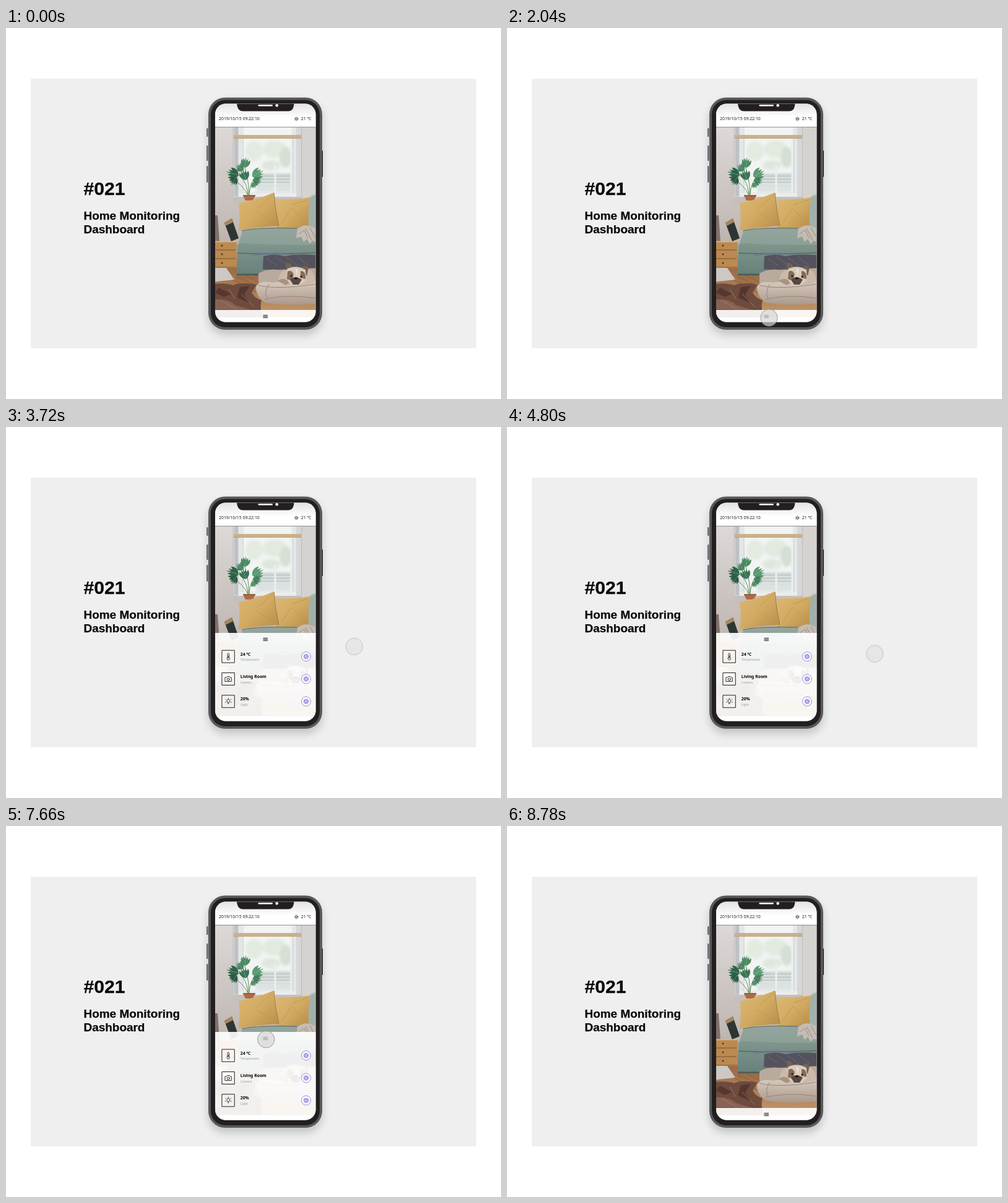
Write an HTML page that moves like this. It is 800x600 px and loops after 9440 ms.

```html
<!DOCTYPE html>
<html lang="en">
<head>
<meta charset="utf-8">
<title>Home Monitoring Dashboard</title>
<style>
html, body { margin: 0; width: 100%; height: 100%; overflow: hidden; background: #fff; }
svg { display: block; width: 800px; height: 600px; }
.title { font-family: "Liberation Sans", Arial, sans-serif; font-weight: 700; fill: #0b0b0b; stroke: #0b0b0b; stroke-width: .25; stroke-linejoin: round; }
.ui { font-family: "Noto Sans", "Noto Sans CJK JP", "Noto Sans CJK", sans-serif; fill: #1c1c1c; }
.name { font-size: 6.8px; font-weight: 700; fill: #000; }
.kind { font-size: 5px; fill: #9b9b9b; }
.line { fill: none; stroke: #222; stroke-width: .9; stroke-linecap: round; stroke-linejoin: round; }
.gear { fill: none; stroke: #7f70d6; stroke-width: .8; }
</style>
</head>
<body>
<svg viewBox="0 0 800 600">
<defs>
  <clipPath id="stage"><rect x="40" y="82" width="720" height="436"/></clipPath>
  <clipPath id="screen"><rect x="338" y="122.500" width="162.500" height="353" rx="17"/></clipPath>
  <clipPath id="view"><rect x="338" y="160" width="162.500" height="308"/></clipPath>
  <filter id="shade" x="-20%" y="-20%" width="140%" height="140%"><feGaussianBlur stdDeviation="7"/></filter>
  <filter id="soft"><feGaussianBlur stdDeviation="2"/></filter>
  <filter id="edge"><feGaussianBlur stdDeviation=".5"/></filter>
  <linearGradient id="top" x2="0" y2="1"><stop stop-color="#e2e2e2"/><stop offset=".6" stop-color="#fff"/></linearGradient>
  <linearGradient id="wall" x2="0" y2="1"><stop stop-color="#dedad8"/><stop offset=".5" stop-color="#c4bcb8"/><stop offset="1" stop-color="#a59890"/></linearGradient>
  <linearGradient id="floor" x2="0" y2="1"><stop stop-color="#9a6b45"/><stop offset="1" stop-color="#c49a6d"/></linearGradient>
  <linearGradient id="seat" x2="0" y2="1"><stop stop-color="#93a59c"/><stop offset="1" stop-color="#8a9f96"/></linearGradient>
  <linearGradient id="front" x2="0" y2="1"><stop stop-color="#7f968d"/><stop offset="1" stop-color="#67807a"/></linearGradient>
  <linearGradient id="gold" x2="1" y2="1"><stop stop-color="#dcb873"/><stop offset=".5" stop-color="#d2aa62"/><stop offset="1" stop-color="#b78b48"/></linearGradient>
  <linearGradient id="bed" x2="0" y2="1"><stop stop-color="#d8cbc0"/><stop offset="1" stop-color="#ab998c"/></linearGradient>
  <g id="leaf">
    <path d="M0 0C-8-3-11-11-8-17L-5-12L-4-19L-1-14L0-22L2-14L5-19L5-12L9-16C11-10 8-3 0 0Z"/>
    <path d="M0-1V-18" stroke="#9cc4a4" stroke-width=".5"/>
  </g>
  <g id="gear" class="gear">
    <circle r="7.500" fill="#fff"/>
    <circle r="3.600" stroke-width="1.200" stroke-dasharray="1.700 1.130"/>
    <circle r="3.100" fill="#dcd7f5"/><circle r="1.300" fill="#fff"/>
  </g>
  <g id="box" class="line"><rect x="-10" y="-10" width="20" height="20" stroke-width="1"/></g>
</defs>

<rect x="40" y="82" width="720" height="436" fill="#efefef"/>

<g class="title">
  <text x="125.500" y="269.500" font-size="30.200">#021</text>
  <text x="125.500" y="310" font-size="18.950">Home Monitoring</text>
  <text x="125.500" y="331.500" font-size="18.950">Dashboard</text>
</g>

<!-- phone body -->
<rect x="327" y="120" width="184" height="376" rx="27" fill="#000" opacity=".18" filter="url(#shade)"/>
<g fill="#58595b">
  <rect x="324.200" y="162" width="2.200" height="14" rx="1"/>
  <rect x="324.200" y="190" width="2.200" height="25" rx="1"/>
  <rect x="324.200" y="223" width="2.200" height="27" rx="1"/>
  <rect x="509" y="198" width="3" height="43" rx="1" fill="#111"/>
  <rect x="327" y="112.500" width="184" height="375.500" rx="27"/>
</g>
<rect x="331" y="116.500" width="176" height="367.500" rx="23" fill="#231f20"/>

<g clip-path="url(#screen)">
  <rect x="338" y="122" width="163" height="354" fill="#fff"/>

  <!-- room view -->
  <g clip-path="url(#view)"><g filter="url(#edge)">
    <rect x="338" y="155" width="163" height="313" fill="url(#wall)"/>
    <rect x="367" y="155" width="111" height="129" fill="#d5d7d8"/>
    <rect x="369" y="155" width="6" height="117" fill="#bfc2c4"/>
    <rect x="376" y="155" width="93" height="117" fill="#e4e7e8"/>
    <rect x="384" y="155" width="78" height="111" fill="#f1f4f2"/>
    <g filter="url(#soft)">
      <ellipse cx="401" cy="199" rx="14" ry="16" fill="#e3ebe1"/>
      <ellipse cx="434" cy="196" rx="19" ry="14" fill="#e2eae0"/>
      <ellipse cx="452" cy="209" rx="10" ry="17" fill="#d5dfd4"/>
      <ellipse cx="428" cy="222" rx="15" ry="8" fill="#dfe6de"/>
      <rect x="404" y="236" width="58" height="16" fill="#c3cdcb"/>
      <rect x="404" y="252" width="58" height="14" fill="#dce2e2"/>
    </g>
    <path d="M404 242H462M404 247H462M404 252H462" stroke="#e6eae9" stroke-width="1.300"/>
    <path d="M435 222V266M461 179V272" stroke="#eceeee" stroke-width="3"/>
    <path d="M383 179V267M463.500 179V267" stroke="#cdd1d2"/>
    <rect x="368" y="173" width="109" height="5" fill="#cbb089"/>
    <path d="M368 178.500H477" stroke="#b09670" stroke-width=".8"/>
    <rect x="376" y="267" width="93" height="6" fill="#ececea"/>
    <rect x="367" y="273" width="111" height="14" fill="#c5c0bd"/>
    <path d="M477.500 155V280M367 155V272" stroke="#b8b5b3" stroke-width=".8"/>
    <rect x="478" y="155" width="30" height="125" fill="#d6d2d0"/>

    <!-- plant -->
    <path d="M391 270C389 250 382 240 369 234M392 270C394 245 384 225 383 212M393 270C394 250 403 240 409 235M391 270C384 257 377 252 372 248" fill="none" stroke="#5d8a5c" stroke-width="1"/>
    <g fill="#4c8a63">
      <use href="#leaf" transform="translate(386 226) rotate(6) scale(.8)"/>
      <use href="#leaf" transform="translate(376 238) rotate(-75) scale(.95)" fill="#2f6349"/>
      <use href="#leaf" transform="translate(398 240) rotate(62) scale(.95)" fill="#5a9a73"/>
      <use href="#leaf" transform="translate(372 241) rotate(-150) scale(.7)" fill="#2a5a42"/>
      <use href="#leaf" transform="translate(399 245) rotate(108) scale(.7)" fill="#437d5a"/>
      <use href="#leaf" transform="translate(388 246) rotate(-18) scale(.85)" fill="#3b7453"/>
      <use href="#leaf" transform="translate(398 250) rotate(150) scale(.5)" fill="#528c66"/>
      <use href="#leaf" transform="translate(384 230) rotate(-58) scale(.7)" fill="#4a8761"/>
    </g>
    <path d="M383 271H403L399 279H387Z" fill="#b06a43"/><path d="M383 271H403" stroke="#8a5032" stroke-width="1.600"/>

    <!-- sofa -->
    <path d="M488 278Q492 268 508 268V337H482Z" fill="#a1b1aa"/>
    <path d="M488 278Q492 270 501 269" fill="none" stroke="#bcc8c1" stroke-width="2"/>
    <path d="M436 277Q465 278 491 274Q488 298 489 322Q462 328 437 324Z" fill="url(#gold)"/>
    <path d="M463 286L487 278M461 291L484 314M460 293L445 317" fill="none" stroke="#b98f4e" stroke-width=".7"/>
    <path d="M376 283Q405 278 433 266Q435 294 441 320Q407 322 376 327Q379 304 376 283Z" fill="url(#gold)"/>
    <path d="M433 267Q435 294 441 320" fill="none" stroke="#a27a3e" stroke-width="1"/>
    <path d="M406 292L431 270M404 297L437 318" fill="none" stroke="#bd934f" stroke-width=".7"/>
    <path d="M382 329Q410 322 508 324V355L374 354Z" fill="url(#seat)"/>
    <path d="M381 328Q410 322 470 324" fill="none" stroke="#6d7a70" stroke-width="1.400"/>
    <path d="M374 351Q376 348 382 348Q445 352 508 350V398L372 400Z" fill="url(#front)"/>
    <path d="M374 364Q438 367 508 363" fill="none" stroke="#56695f" stroke-width="1.600"/>
    <path d="M400 368Q430 362 466 367" fill="none" stroke="#70739b" stroke-width="3" opacity=".5"/>
    <path d="M373 399H420" stroke="#4c5b55" stroke-width="3"/>
    <path d="M471 325Q480 317 491 320L508 327V348L495 344L491 349L486 341L481 346L477 337L469 340Z" fill="#c5bcb3"/>
    <path d="M473 333L482 327L488 340M484 324L494 343M491 323L501 340" fill="none" stroke="#968c83"/>

    <!-- chest -->
    <path d="M338 303V346H345L342 303Z" fill="#7f7069"/>
    <rect x="330" y="345" width="43" height="42" fill="#bb8a51"/>
    <path d="M330 345.500H373" stroke="#d9b47f" stroke-width="2"/>
    <path d="M330 359H371M330 373H371M330 387H372" stroke="#7a5330" stroke-width="1.200"/>
    <g fill="#4d341f"><circle cx="349" cy="352" r="1.400"/><circle cx="349" cy="366" r="1.400"/><circle cx="349" cy="380" r="1.400"/></g>
    <path d="M353 315L365 308L376 340L364 345Z" fill="#2e3532"/>
    <path d="M353 315L365 308L367 314L355 320Z" fill="#a4885c"/>

    <!-- floor -->
    <rect x="330" y="388" width="43" height="80" fill="url(#floor)"/>
    <rect x="372" y="400" width="136" height="68" fill="url(#floor)"/>
    <path d="M330 388H356L369 407L330 411Z" fill="#ccc8c4"/>
    <path d="M372 402L400 414M366 407L415 433M388 401L410 412" stroke="#855c3a" stroke-width=".8"/>
    <path d="M330 415Q352 411 367 416Q382 410 405 415L397 428Q403 438 413 440Q409 452 416 468H330Z" fill="#6f4b3e"/>
    <path d="M344 420L364 430L352 435L338 428ZM378 419L394 417L385 431L394 445L373 436Z" fill="#553730"/>
    <path d="M330 439Q360 437 370 448L396 456L330 455Z" fill="#886353"/>
    <path d="M360 422L370 438M380 430L401 451M346 440L372 455" stroke="#a5806c" stroke-width=".8"/>

    <!-- blankets and dog -->
    <path d="M416 369Q434 364 450 369Q476 364 508 368V390L466 390L444 393L415 390Z" fill="#54535d"/>
    <path d="M422 373L438 384M436 370L456 385M454 371L472 385M471 370L488 384" stroke="#6d6c7c" stroke-width="1.400" stroke-dasharray="2 2"/>
    <path d="M408 397Q421 389 439 391L508 388V418L408 417Z" fill="#b9aa9d"/>
    <path d="M404 418Q411 408 430 412Q466 407 508 409V445Q454 450 418 444Q403 433 404 418Z" fill="url(#bed)"/>
    <path d="M408 416Q438 424 501 414M417 439Q451 430 501 437M425 414Q416 427 422 438" fill="none" stroke="#97867a"/>
    <path d="M440 408Q442 392 453 391Q475 384 491 391Q500 397 499 411Q479 418 459 415Z" fill="#cbb9a9"/>
    <path d="M439 409Q449 401 459 412L452 416Z" fill="#a8937f"/>
    <path d="M453 392L452 380Q458 378 463 386ZM477 388Q483 381 489 388L486 401Z" fill="#77604f"/>
    <path d="M454 390Q468 382 484 391L485 407Q476 418 464 416Q451 413 454 390Z" fill="#d9cabb"/>
    <path d="M455 394Q461 390 465 398L462 409L454 406ZM476 393Q485 393 484 406L476 404Z" fill="#846b59"/>
    <path d="M459 407Q467 399 478 407L473 415H464Z" fill="#574941"/>
    <path d="M468 390L471 390L470 403Z" fill="#efe6da"/>
    <g fill="#1c1918"><circle cx="461" cy="401" r="1.600"/><circle cx="477" cy="402" r="1.600"/><ellipse cx="468.500" cy="405" rx="2.800" ry="1.800"/></g>
  </g></g>

  <!-- status header -->
  <rect x="338" y="122" width="163" height="38" fill="url(#top)"/>
  <path d="M338 160.300H501" stroke="#85817e" stroke-width=".9"/>
  <g class="ui" font-size="6.900">
    <text x="344" y="149">2019/10/15 09:22:10</text>
    <text x="476.800" y="149">21 ℃</text>
  </g>
  <g class="line" transform="translate(469.300 147)" stroke-width=".8">
    <circle r="1.700"/>
    <circle r="3" stroke-width="1" stroke-dasharray=".8 1.556" stroke-linecap="butt"/>
  </g>
  <path d="M373 116V122Q374 134.500 383 134.500H456Q465 134.500 465.500 122V116Z" fill="#231f20"/>

  <!-- sliding panel, laid out in its open position -->
  <g id="panel">
    <rect x="338" y="333" width="163" height="134" fill="#fff" opacity=".91"/>
    <rect x="338" y="467" width="163" height="140" fill="#fff"/>
    <path d="M338 467H501" stroke="#efedec" stroke-width=".8"/>
    <path d="M415.500 341.500H423M415.500 343.500H423M415.500 345.500H423" stroke="#222" stroke-width="1.100"/>
    <g id="rows" class="ui"></g>
  </g>
</g>

<rect x="407.500" y="124" width="23.500" height="2.600" rx="1.300" fill="#fff"/>
<circle cx="437.700" cy="125.300" r="2.300" fill="#fff"/>

<g clip-path="url(#stage)"><circle id="touch" r="13.700" stroke-width=".9"/></g>
</svg>

<script>
const LOOP = 9440;
const $ = id => document.getElementById(id);

const icons = [
  '<path d="M-1.300 1.400V-3.900A1.300 1.300 0 0 1 1.300-3.900V1.400A2.300 2.300 0 1 1-1.300 1.400ZM0-1V3"/>',
  '<path d="M-5-2.500H-2.800L-1.800-4H1.800L2.800-2.500H5V4H-5Z"/><circle cy=".6" r="2"/>',
  '<path d="M-1.400 1.500Q-2.600 0-2.200-1.500A2.250 2.250 0 0 1 2.200-1.500Q2.600 0 1.400 1.500ZM-1.200 3.500H1.200M0-5.500V-4.500M-4.500-3.500L-3.800-2.900M4.500-3.500L3.800-2.900M-5 1.500L-3.800 1M5 1.500L3.800 1"/>'
];
const rows = [['24 ℃', 'Temperature'], ['Living Room', 'Camera'], ['20%', 'Light']];
$('rows').innerHTML = rows.map(([name, kind], i) => `
  <g transform="translate(0 ${371.2 + 36.3 * i})">
    <use href="#box" x="359.300"/>
    <g class="line" transform="translate(359.300 0)">${icons[i]}</g>
    <text class="name" x="378.800" y="-1.400">${name}</text>
    <text class="kind" x="378.800" y="7.300">${kind}</text>
    <use href="#gear" x="485"/>
  </g>`).join('');

const linear = u => u;
const out = u => 1 - (1 - u) ** 2;
const cubic = u => 1 - (1 - u) ** 3;
const both = u => u < .5 ? 2 * u * u : 1 - 2 * (1 - u) ** 2;
const lift = u => u ** 1.2;

// Each key: time, value, easing used on the way to that value.
const touchX = [
  [580, 732], [600, 710], [740, 553], [960, 510], [1260, 440, out],
  [1390, 440], [1520, 423.5, both], [2760, 423.5], [3200, 412, both], [3960, 600, both],
  [4730, 600], [5300, 416, both], [5520, 421, both], [6130, 421], [6420, 429, both],
  [6650, 429], [6760, 425, both], [7290, 425], [7500, 420.3, both],
  [8200, 420.3], [8740, 737.5, both]
];
const touchY = [
  [580, 46], [600, 103], [740, 499], [760, 555], [960, 540], [1260, 473, out],
  [1390, 473], [1520, 468.5, both], [2760, 468.5], [3640, 355, out], [3720, 355], [3960, 367, both],
  [4730, 367], [5520, 348, both], [6130, 348], [6420, 354, both],
  [6650, 354], [6760, 344, both], [7290, 344], [7500, 345, both],
  [8200, 345], [8780, 62, lift]
];
const panelY = [[2240, 123], [2650, 0, cubic], [7780, 0], [8190, 123, cubic]];
const presses = [[2040, 2260], [5680, 5840], [6960, 7120], [7660, 7800]];

function at(track, t) {
  const i = track.findIndex(key => key[0] > t);
  if (i < 0) return track[track.length - 1][1];
  if (i === 0) return track[0][1];
  const [t0, v0] = track[i - 1];
  const [t1, v1, ease = linear] = track[i];
  return v0 + (v1 - v0) * ease((t - t0) / (t1 - t0));
}

const start = performance.now();
function draw() {
  const t = (performance.now() - start) % LOOP;
  const down = presses.some(([a, b]) => t >= a && t < b);
  const touch = $('touch');
  touch.setAttribute('cx', at(touchX, t));
  touch.setAttribute('cy', at(touchY, t));
  touch.setAttribute('fill', down ? 'rgba(214,214,214,.7)' : 'rgba(205,205,205,.25)');
  touch.setAttribute('stroke', down ? '#929292' : 'rgba(180,180,180,.8)');
  $('panel').setAttribute('transform', `translate(0 ${at(panelY, t)})`);
  requestAnimationFrame(draw);
}
draw();
</script>
</body>
</html>
```
